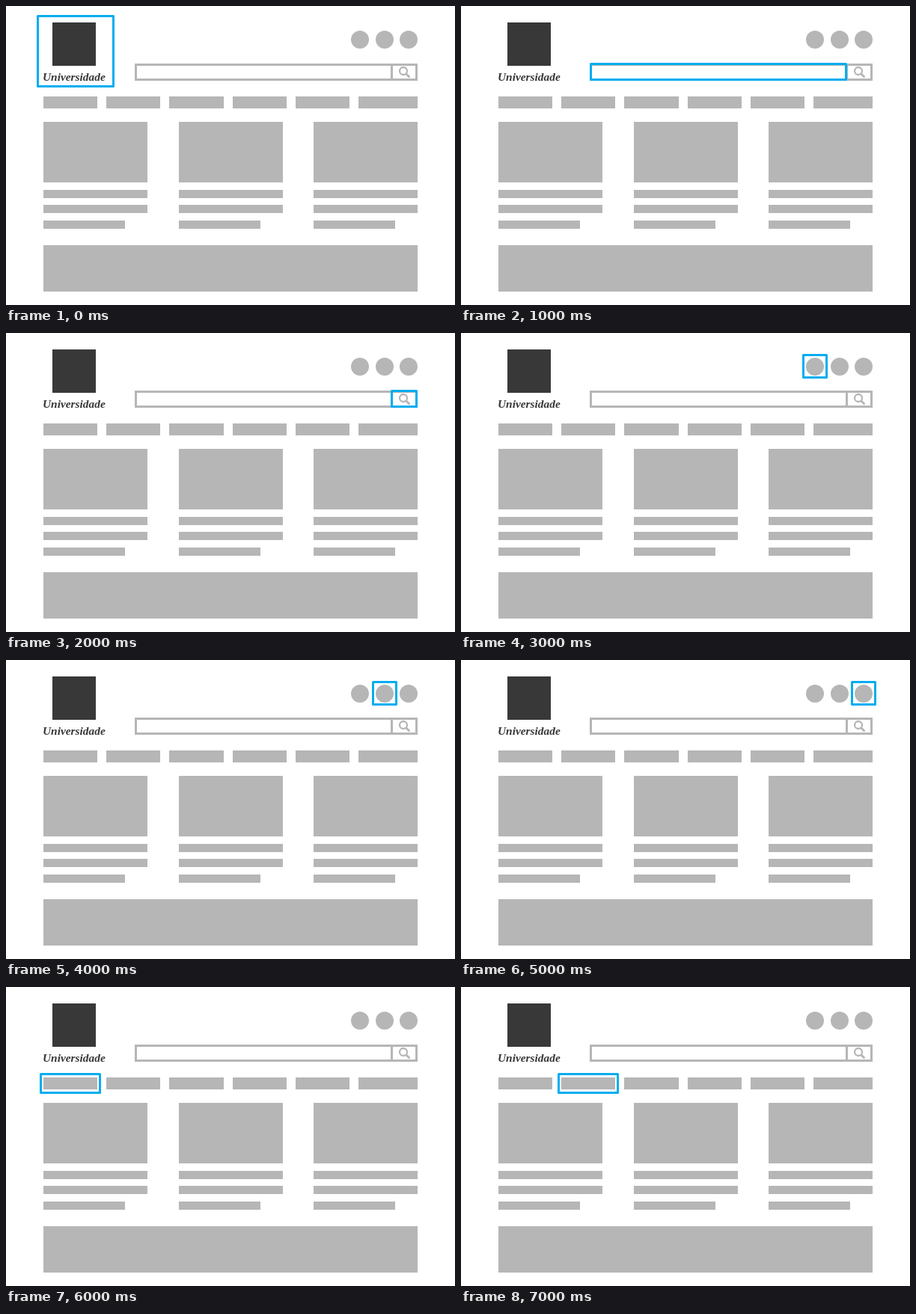
Write an HTML page with a canvas that moves like this. It is 600x400 px and loops after 8000 ms.

```html
<!DOCTYPE html>
<html lang="pt">
<head>
<meta charset="utf-8">
<title>Wireframe</title>
<style>
html, body { margin: 0; width: 100%; height: 100%; overflow: hidden; background: #fff; }
canvas { display: block; }
</style>
</head>
<body>
<canvas id="stage" width="600" height="400"></canvas>
<script>
const ctx = document.getElementById('stage').getContext('2d');
const GRAY = '#b6b6b6', DARK = '#383838', BLUE = '#00adef';
const LEFT = 50, RIGHT = 550;
const STEP = 1000, LINE = 3;

const rect = (x, y, w, h) => ({ x, y, w, h });
const pad = (r, dx, dy) => rect(r.x - dx, r.y - dy, r.w + 2 * dx, r.h + 2 * dy);

// Evenly spaced items, snapped to whole pixels
const repeat = (count, start, pitch, make) =>
  Array.from({ length: count }, (_, i) => make(Math.round(start + i * pitch), i));

const brand = rect(41, 12, 104, 97);
const searchBar = rect(172, 77, RIGHT - 172, 23);
const searchButton = rect(514, 77, RIGHT - 514, 23);
const searchField = rect(172, 77, 344, 23);

const dots = repeat(3, 473, 32.5, x => rect(x - 12, 33, 24, 24));
const menuPitch = 84.2, menuWidth = 72.2;
const menu = repeat(6, LEFT, menuPitch, (x, i) => {
  const end = i < 5 ? Math.round(LEFT + i * menuPitch + menuWidth) : RIGHT;
  return rect(x, 121, end - x, 16);
});
const cards = repeat(3, LEFT, 180.5, x => rect(x, 155, 139, 81));

const raise = r => rect(r.x, r.y - 1, r.w, r.h + 1);
const highlights = [
  brand,
  raise(searchField),
  raise(searchButton),
  ...dots.map(r => rect(r.x - 5, r.y - 5, r.w + 10, r.h + 9)),
  ...menu.slice(0, 2).map(r => pad(r, 5, 6))
];

function fill({ x, y, w, h }, color = GRAY) {
  ctx.fillStyle = color;
  ctx.fillRect(x, y, w, h);
}

function outline(r, color, join = 'miter') {
  const { x, y, w, h } = pad(r, -LINE / 2, -LINE / 2);
  ctx.strokeStyle = color;
  ctx.lineWidth = LINE;
  ctx.lineJoin = join;
  ctx.strokeRect(x, y, w, h);
}

function drawDot({ x, y, w }) {
  const radius = w / 2;
  ctx.fillStyle = GRAY;
  ctx.beginPath();
  ctx.arc(x + radius, y + radius, radius, 0, Math.PI * 2);
  ctx.fill();
}

function drawBrand() {
  fill(rect(62, 22, 58, 58), DARK);
  ctx.font = 'italic bold 15.4px "Liberation Serif", serif';
  ctx.fillText('Universidade', 49, 100);
}

function drawMagnifier(x, y) {
  ctx.strokeStyle = GRAY;
  ctx.lineCap = 'round';
  ctx.lineWidth = 2.3;
  ctx.beginPath();
  ctx.arc(x, y, 5, 0, Math.PI * 2);
  ctx.stroke();
  ctx.lineWidth = 3;
  ctx.beginPath();
  ctx.moveTo(x + 4.2, y + 4.2);
  ctx.lineTo(x + 7.5, y + 7.5);
  ctx.stroke();
}

function drawCard(card) {
  fill(card);
  repeat(3, 246, 20.4, (y, i) => fill(rect(card.x, y, i < 2 ? card.w : 109, 11)));
}

function drawPage() {
  fill(rect(0, 0, 600, 400), '#fff');
  drawBrand();
  dots.forEach(drawDot);
  outline(searchBar, GRAY);
  outline(searchButton, GRAY);
  drawMagnifier(531, 87);
  menu.forEach(r => fill(r));
  cards.forEach(drawCard);
  fill(rect(LEFT, 320, RIGHT - LEFT, 62));
}

function frame() {
  const step = Math.floor(performance.now() / STEP) % highlights.length;
  drawPage();
  outline(highlights[step], BLUE, 'round');
  requestAnimationFrame(frame);
}
frame();
</script>
</body>
</html>
```
